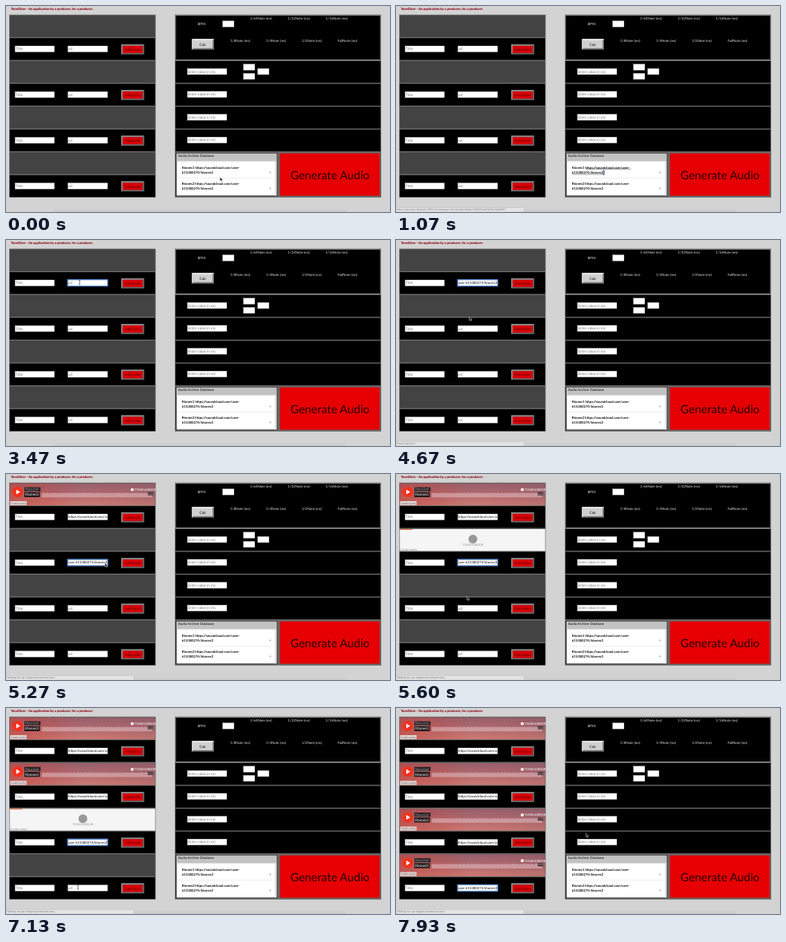
Write an HTML page that moves like this. It is 480x258 px and loops after 8 s.

```html
<!DOCTYPE html>
<html lang="en">
<head>
<meta charset="utf-8">
<title>Audio splicing demo</title>
<style>
  html, body { margin: 0; width: 100%; height: 100%; overflow: hidden; background: #d3d3d3; }
  svg { display: block; }
  body > svg { width: 100%; height: 100%; }
  text { font-family: Lato, "Open Sans", sans-serif; text-rendering: geometricPrecision; white-space: pre; }
</style>
</head>
<body>
<svg id="stage" viewBox="0 0 480 258">
  <defs>
    <linearGradient id="sky" x1="0" y1="0" x2="0" y2="1">
      <stop offset="0" stop-color="#95606d"/>
      <stop offset=".5" stop-color="#b06a70"/>
      <stop offset="1" stop-color="#cd7b74"/>
    </linearGradient>
    <linearGradient id="glow">
      <stop offset="0" stop-color="#c4443c" stop-opacity=".6"/>
      <stop offset=".5" stop-color="#c4443c" stop-opacity="0"/>
      <stop offset="1" stop-color="#75505f" stop-opacity=".2"/>
    </linearGradient>
    <linearGradient id="strip" x1="0" y1="0" x2="0" y2="1">
      <stop offset="0" stop-color="#d3d3d3"/>
      <stop offset="1" stop-color="#c9c9c9"/>
    </linearGradient>
  </defs>
</svg>
<script>
const LOOP = 8000, FPS = 15, GROUP = 57.2;
const USER = 'user-615380274', TRACK = 'ktones3';
const URL_TEXT = `https://soundcloud.com/${USER}/${TRACK}`;
const stage = document.getElementById('stage');

function add(parent, tag, attrs = {}, content = '') {
  const el = document.createElementNS('http://www.w3.org/2000/svg', tag);
  for (const key in attrs) el.setAttribute(key, attrs[key]);
  el.textContent = content;
  parent.appendChild(el);
  return el;
}
const group = (parent = stage, attrs) => add(parent, 'g', attrs);
const rect = (parent, x, y, width, height, fill, more) =>
  add(parent, 'rect', { x, y, width, height, fill, ...more });
const label = (parent, x, y, size, fill, content, more) =>
  add(parent, 'text', { x, y, 'font-size': size, fill, ...more }, content);
const show = (el, on) => el.setAttribute('visibility', on ? 'inherit' : 'hidden');
const MIDDLE = { 'text-anchor': 'middle' }, BOLD = { 'font-weight': 700 };

function cell(x, y, w, h, fill, edge = .6, line = '#777') {
  rect(stage, x, y, w, h, line);
  rect(stage, x + edge, y + edge, w - 2 * edge, h - 2 * edge, fill);
}

function bevel(x, y, w, h, fill, light, dark) {
  rect(stage, x, y, w, h, dark);
  add(stage, 'path', { d: `M${x} ${y + h}V${y}h${w}l-1.8 1.8h${3.6 - w}v${h - 3.6}z`, fill: light });
  return rect(stage, x + 1.8, y + 1.8, w - 3.6, h - 3.6, fill);
}

function input(x, y, w, hint = '') {
  rect(stage, x + .3, y + .3, w - .3, 7.6, '#fff', { stroke: '#aaa', 'stroke-width': .3 });
  return label(stage, x + 1, y + 5.6, 4.6, '#777', hint);
}

// Page frame
rect(stage, 0, 0, 480, 258, '#d3d3d3');
rect(stage, 60, 253.5, 365, 4.5, 'url(#strip)');
const TITLE = 'ToneDicer - An application by a producer, for a producer.';
label(stage, 6.3, 5.3, 4.13, '#d08b92', TITLE, BOLD);
label(stage, 5.9, 4.9, 4.13, '#861322', TITLE, BOLD);

// Left column
rect(stage, 4, 10.8, 183.2, 228.8, '#666');
const slots = [0, 1, 2, 3].map(i => {
  const y = 11 + i * GROUP;
  cell(4, y, 183, 28.6, '#434343');
  cell(4, y + 28.6, 183, 28.6, '#000');
  input(11, y + 38.7, 49.5, 'Title');
  const hint = input(77, y + 38.7, 50, 'url');
  const box = add(stage, 'svg', { x: 77.5, y: y + 39, width: 49, height: 8 });
  const head = label(box, .6, 5.3, 4.25, '#111', URL_TEXT);
  const tail = label(box, 48.6, 5.3, 4.25, '#111', URL_TEXT, { 'text-anchor': 'end' });
  const ring = rect(stage, 77, y + 38.7, 50, 8, 'none', { stroke: '#5b93e8', 'stroke-width': 1.1 });
  const button = bevel(144, y + 37, 28.7, 12.6, '#d80008', '#8c8c8c', '#686868');
  label(stage, 158.4, y + 44.9, 4.3, '#5c0004', 'Add Audio', MIDDLE);
  return { hint, head, tail, ring, button, loading: loadingCard(y), player: playerCard(y) };
});

function loadingCard(y) {
  const g = group(stage, { transform: `translate(4.6 ${y + .8})` });
  rect(g, 0, 0, 182, 27.4, '#f5f5f5');
  rect(g, 0, 0, 16, .9, '#f05a28');
  add(g, 'circle', { cx: 91.5, cy: 12.5, r: 5.5, fill: '#999' });
  label(g, 91.5, 21.3, 3.8, '#999', 'TONEHARBOR', MIDDLE);
  label(g, .6, 26.6, 3.6, '#888', 'Cookie policy');
  return g;
}

// Jagged waveform outline
function waveform() {
  let d = 'M40 17.5';
  for (let x = 40; x <= 178; x += 1.5) {
    const swell = Math.sin(x * 1.7) * Math.sin(x * .37);
    d += `L${x} ${(12 - .8 * swell).toFixed(2)}`;
  }
  return d + 'V17.5z';
}

function playerCard(y) {
  const g = group(stage, { transform: `translate(4.6 ${y + .8})` });
  rect(g, 0, 0, 182, 27.4, 'url(#sky)');
  rect(g, 0, 0, 182, 27.4, 'url(#glow)');
  add(g, 'path', { d: waveform(), fill: '#ead0d4', opacity: .45 });
  add(g, 'circle', { cx: 10, cy: 10.7, r: 6.4, fill: '#f4301b' });
  add(g, 'path', { d: 'M8.2 7.6l5 3.1l-5 3.1z', fill: '#fff' });
  rect(g, 18.4, 4.8, 20.2, 5.2, '#2b2024');
  label(g, 19.4, 8.7, 3.8, '#aaa', 'Mara Lind', { 'text-decoration': 'underline' });
  rect(g, 18.4, 10.9, 19.3, 6.3, '#21191c');
  label(g, 19.4, 15.6, 4.6, '#fff', 'Ktones3');
  add(g, 'circle', { cx: 153.2, cy: 7.8, r: 1.9, fill: '#fff' });
  label(g, 156, 9.2, 3.9, '#fff', 'TONEHARBOR');
  rect(g, 172.5, 11, 7, 3.8, '#3b2b31');
  label(g, 176, 14, 3, '#ddd', '0:10', MIDDLE);
  rect(g, .4, 22.2, 20.8, 5, '#e3d5d3', { rx: .6 });
  label(g, 1.2, 25.9, 3.4, '#666', 'Cookie policy');
  return g;
}

// Right column
rect(stage, 211, 10.8, 258, 228.8, '#666');
cell(211, 10.8, 258, 57.6, '#000', 1.4, '#858585');
label(stage, 239.5, 23.7, 4.4, '#ddd', 'BPM:');
input(270.5, 18.3, 14.5);
bevel(232.5, 41.2, 27.5, 13.4, '#d0d0d0', '#ededed', '#777');
label(stage, 246, 49.6, 4.6, '#111', 'Calc', MIDDLE);
['1/64', '1/32', '1/16'].forEach((n, i) =>
  label(stage, 305 + i * 47.3, 17.2, 4.3, '#ddd', n + 'Note (ms)'));
['1/8', '1/4', '1/2', 'Full'].forEach((n, i) =>
  label(stage, 280.3 + i * 44.7, 45.2, 4.3, '#ddd', n + 'Note (ms)'));
for (let i = 0; i < 4; i++) {
  const y = 68.3 + i * 28.6;
  cell(211.3, y, 257.4, 28.6, '#000');
  input(226.5, y + 9.7, 49.5, 'Enter value in ms');
}
[[296.5, 72.5], [296.5, 84], [314.3, 78]].forEach(([x, y]) => input(x, y, 14.5));

// Archive list
cell(211, 182.7, 129.5, 56.8, '#2a2a2a', 1);
rect(stage, 213.3, 184.8, 125, 52.6, '#fff');
rect(stage, 213.3, 184.8, 125, 9.7, '#c2c2c2');
rect(stage, 336.3, 194.5, 2, 42.9, '#ddd');
label(stage, 215, 189.1, 4.3, '#111', 'Audio Archive Database');
rect(stage, 214, 215, 122, .5, '#ddd');
const MARK = '#9fc3f3';
const markTop = rect(stage, 237, 199.4, 58, 6.2, MARK);
const markLow = rect(stage, 220, 205.6, 40, 6.2, MARK);
['Ktones1', 'Rtones2'].forEach((name, i) => {
  const y = 203.6 + i * 20;
  label(stage, 219.8, y, 4.23, '#111', `${name} https://soundcloud.com/user-`, BOLD);
  label(stage, 219.8, y + 6.6, 4.23, '#111', `615380274/${TRACK}`, BOLD);
  label(stage, 329, y + 6.8, 4.6, '#555', '×');
});
const underline = add(stage, 'path', { d: 'M237 204.3H294M220 210.9H259.5', stroke: '#111', 'stroke-width': .4 });

cell(340.5, 182.7, 128.5, 56.8, '#e60003', 1.9, '#666');
label(stage, 405, 217, 14.4, '#240002', 'Generate Audio', MIDDLE);

// Browser status bubble
const status = group();
add(status, 'path', { d: 'M0 252.4H158.5q1.5 0 1.5 1.5V258H0z', fill: '#e4e4e4', stroke: '#b5b5b5', 'stroke-width': .4 });
const statusText = label(status, 1.2, 256.4, 3.45, '#777', '');
const messages = [
  [900, 'https://aqueous-beyond-24991.herokuapp.com/sounds/delete/5b9bf5ed5420ac3bd4f6f7'],
  [3130, ''],
  [4530, 'Resolving host...'],
  [5190, 'Waiting for api-widget.soundcloud.com...']
];

// Pointer
const pointer = group();
const arrow = add(pointer, 'path', {
  d: 'M0 0V4.8l1.2-1 .8 1.7.8-.4-.8-1.6h1.6z', fill: '#111', stroke: '#fff', 'stroke-width': .4
});
const beam = add(pointer, 'path', {
  d: 'M-1-2.3Q0-2.3 0-1.7Q0-2.3 1-2.3M0-1.7V2.3M-1 2.8Q0 2.8 0 2.2Q0 2.8 1 2.8',
  fill: 'none', stroke: '#222', 'stroke-width': .6
});
const path = [
  [0, 267.5, 214.5], [530, 267.5, 214.5], [600, 261.5, 209], [1000, 260, 209],
  [1600, 262, 203], [2070, 237, 203], [2680, 237, 203], [2870, 123, 132],
  [3000, 123, 132], [3230, 92, 53], [4180, 92, 53], [4350, 158, 55],
  [4500, 158, 55], [4660, 91.5, 95.5], [4860, 92, 111], [5190, 92, 111],
  [5350, 158, 112], [5430, 158, 112], [5590, 88.5, 152.5], [5860, 89.5, 169.5],
  [6530, 89.5, 169.5], [6660, 158, 169], [6770, 158, 169], [6930, 90, 224],
  [7390, 90, 224], [7520, 158, 226], [7620, 158, 226], [7860, 237, 157], [7920, 239, 155.3]
];
const beamTimes = [[1000, 2690], [3200, 4190], [4860, 5200], [5850, 6540], [6920, 7400]];

const focusAt = [3260, 4950, 6130, 7200];
const pasteAt = [3660, 5130, 6460, 7330];
const clickAt = [4400, 5380, 6700, 7550];
const loadingAt = [4790, 5460, 6860, 7590];
const readyAt = [5260, 5920, 7260, 7790];

function along(t) {
  const i = path.findIndex(p => p[0] > t);
  if (i < 0) return path[path.length - 1].slice(1);
  const [t0, x0, y0] = path[i - 1], [t1, x1, y1] = path[i];
  const k = (t - t0) / (t1 - t0);
  return [x0 + (x1 - x0) * k, y0 + (y1 - y0) * k];
}

function drawSelection(t, x) {
  const on = t >= 1050 && t < focusAt[0], twoLines = t >= 1450;
  const left = Math.max(237, t < 2070 ? x : 237);
  show(markTop, on && twoLines);
  show(markLow, on);
  markTop.setAttribute('x', left);
  markTop.setAttribute('width', 295 - left);
  const lowLeft = twoLines ? 220 : 260 - 40 * (t - 1050) / 400;
  markLow.setAttribute('x', lowLeft);
  markLow.setAttribute('width', Math.max(0, 260 - lowLeft));
  show(underline, t >= 900 && t < 2720);
}

function draw(t) {
  const [x, y] = along(t);
  const isBeam = beamTimes.some(([a, b]) => t >= a && t < b);
  pointer.setAttribute('transform', `translate(${x} ${y})`);
  show(arrow, !isBeam);
  show(beam, isBeam);
  drawSelection(t, x);

  slots.forEach((slot, i) => {
    const focused = t >= focusAt[i] && t < (focusAt[i + 1] || LOOP);
    const filled = t >= pasteAt[i];
    show(slot.hint, !filled);
    show(slot.head, filled && !focused);
    show(slot.tail, filled && focused);
    show(slot.ring, focused);
    show(slot.loading, t >= loadingAt[i] && t < readyAt[i]);
    show(slot.player, t >= readyAt[i]);
    slot.button.setAttribute('fill', Math.abs(t - clickAt[i]) < 60 ? '#b00006' : '#d80008');
  });

  const message = messages.filter(m => m[0] <= t).pop();
  statusText.textContent = message ? message[1] : '';
  show(status, message && message[1]);
}

const start = performance.now();
function tick() {
  const t = (performance.now() - start) % LOOP;
  draw(Math.floor(t * FPS / 1000) * 1000 / FPS);
  requestAnimationFrame(tick);
}
tick();
</script>
</body>
</html>
```
